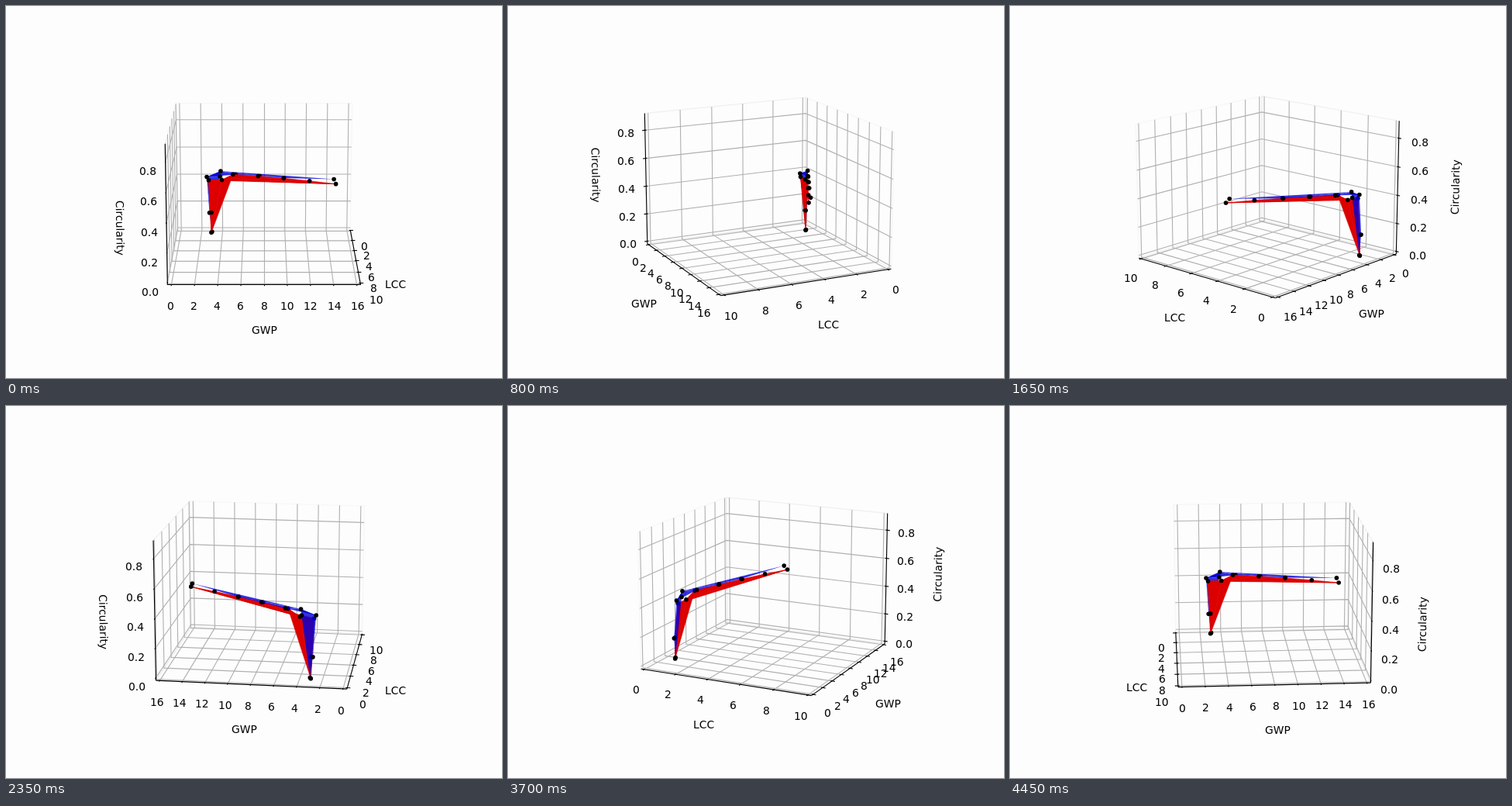
Recreate the animation shown at these times as an HTML page with a canvas. Size 640 by 480 pixels, loop 4500 ms.

```html
<!DOCTYPE html>
<html lang="en">
<head>
<meta charset="utf-8">
<title>Rotating 3D plot</title>
<style>
html, body { margin: 0; width: 100%; height: 100%; overflow: hidden; background: #fdfdfd; }
canvas { display: block; }
</style>
</head>
<body>
<canvas id="plot" width="640" height="480"></canvas>
<script>
const ctx = document.getElementById('plot').getContext('2d');
const LO = -1 / 48, HI = 49 / 48, EPS = 1e-9;
const ELEV = Math.PI / 12, SE = Math.sin(ELEV), CE = Math.cos(ELEV);
const TICK_GAP = 1.0372 / 12, LABEL_GAP = 2.796 / 12;
const PT = 100 / 72;

// side: the other direction in which the axis sits at the front
const axes = [
  { name: 'LCC', max: 10, step: 2, digits: 0, side: 1, pane: 242 },
  { name: 'GWP', max: 16, step: 2, digits: 0, side: 0, pane: 230 },
  { name: 'Circularity', max: 0.9, step: 0.2, digits: 1, side: 0, pane: 236 }
];

const point = (lcc, gwp, circ) => [lcc / 10, gwp / 16, circ / 0.9];

// evenly spaced points whose circularity rises and levels off
const chain = (n, lcc, gwp, dLcc, dGwp) => Array.from({ length: n }, (_, i) =>
  point(lcc + i * dLcc, gwp + i * dGwp, .448 + .012 * i - .0014 * i * i));

// triangles from one tip to each link of a chain
const fan = (tip, links) => links.slice(1).map((p, i) => [tip, links[i], p]);

function blueFaces() {
  const foot = point(.82, 3.03, .006), shin = point(.83, 2.8, .147);
  const left = point(1.1, 2.59, .42), mid = point(.99, 3.83, .42), top = point(1.02, 3.9, .461);
  const arm = [...chain(3, 1.45, 5.34, .7, 2.25), point(4.24, 14.36, .502)];
  return [...fan(left, [shin, foot, mid, top, arm[0]]), ...fan(top, arm)];
}

function redFaces() {
  const foot = point(.82, 2.96, 0), shin = point(.83, 2.98, .149);
  const left = point(1.12, 2.77, .397), mid = point(1.22, 4.02, .402);
  const arm = chain(5, 1.4, 5.09, .7525, 2.36);
  return [...fan(left, [shin, foot, mid, arm[4]]), ...fan(mid, [foot, ...arm])];
}

const surfaces = [
  { color: 'rgba(0,0,219,.8)', faces: blueFaces() },
  { color: '#dc0000', faces: redFaces(), edge: .6 }
];

let sin, cos;

// unit-cube point -> [screen x, screen y, distance]
function project(p) {
  const x = (p[0] - .5) * 8 / 7, y = (p[1] - .5) * 8 / 7, z = (p[2] - .5) * 6 / 7;
  const r = x * cos + y * sin, s = y * cos - x * sin;
  const w = 10 - r * CE - z * SE, k = 369.6 / .185 / w;
  return [332.995 + s * k, 237.405 - (z * CE - r * SE) * k, w];
}

function put(p, i, v) {
  const q = p.slice();
  q[i] = v;
  return q;
}

const flip = (p, i) => put(p, i, LO + HI - p[i]);

// push a point away from the cube centre, except along axis i
const away = (p, i, d) => p.map((v, j) => j === i ? v : v + (v > .5 ? d : -d));

function trace(pts) {
  ctx.beginPath();
  for (const p of pts) ctx.lineTo(p[0], p[1]);
}

// straight upright or level lines sit on whole pixels
function snap(pts) {
  const same = i => pts.every(p => Math.abs(p[i] - pts[0][i]) < .01);
  if (same(0)) return pts.map(p => [Math.floor(p[0] + .5) + .5, p[1]]);
  if (same(1)) return pts.map(p => [p[0], Math.ceil(p[1] - .5) - .5]);
  return pts;
}

function stroke(pts, color, width = .8 * PT) {
  trace(snap(pts.map(project)));
  ctx.strokeStyle = color;
  ctx.lineWidth = width;
  ctx.stroke();
}

function write(text, x, y) {
  ctx.fillText(text, Math.round(x - ctx.measureText(text).width / 2), Math.round(y));
}

function drawPanes(back) {
  axes.forEach(({ pane }, i) => {
    const j = (i + 1) % 3, k = (i + 2) % 3, a = flip(back, j);
    stroke([back, a, flip(a, k), flip(back, k), back], `rgba(${pane},${pane},${pane},.5)`, PT);
  });
}

function drawAxis({ name, max, step, digits, side }, i, back) {
  const [j, k] = [0, 1, 2].filter(n => n !== i);
  const start = flip(back, side), end = flip(start, i);
  const ticks = [];
  for (let t = 0; t <= max; t += step) ticks.push(t);

  for (const t of ticks) {
    const base = put(back, i, t / max);
    stroke([flip(base, j), base, flip(base, k)], '#b0b0b0');
  }
  stroke([start, end], '#000');

  const out = start[side] > .5 ? 1 / 12 : -1 / 12;
  ctx.fillStyle = '#000';
  for (const t of ticks) {
    const p = put(start, i, t / max), v = p[side];
    stroke([put(p, side, v + .2 * out), put(p, side, v - .1 * out)], '#000');
    const [x, y] = project(away(p, i, TICK_GAP));
    write(t.toFixed(digits), x, y + 11);
  }

  const [x, y] = project(away(put(start, i, .5), i, LABEL_GAP));
  if (i < 2) return write(name, x, y + 4);
  const a = project(start), b = project(end);
  let turn = Math.atan2(b[1] - a[1], b[0] - a[0]);
  if (turn < -Math.PI / 2) turn += Math.PI;
  ctx.save();
  ctx.translate(x + 1, y);
  ctx.rotate(turn);
  write(name, 0, 4);
  ctx.restore();
}

function drawSurface({ color, edge, faces, dots }) {
  const depth = f => f.reduce((sum, p) => sum + p[2], 0);
  ctx.fillStyle = ctx.strokeStyle = color;
  ctx.lineWidth = edge;
  for (const f of faces.sort((a, b) => depth(b) - depth(a))) {
    trace(f);
    ctx.closePath();
    ctx.fill();
    if (edge) ctx.stroke();
  }
  ctx.fillStyle = '#000';
  for (const [x, y] of dots) {
    ctx.beginPath();
    ctx.arc(x, y, 2.8, 0, 7);
    ctx.fill();
  }
}

function draw(now) {
  const azim = Math.floor(now / 50) % 90 * Math.PI / 45;
  sin = Math.sin(azim);
  cos = Math.cos(azim);
  ctx.fillStyle = '#fdfdfd';
  ctx.fillRect(0, 0, 640, 480);
  ctx.font = '13.889px "DejaVu Sans", sans-serif';
  ctx.lineJoin = 'round';

  const back = [cos < -EPS ? HI : LO, sin < -EPS ? HI : LO, LO];
  drawPanes(back);
  axes.forEach((axis, i) => drawAxis(axis, i, back));

  // the surface with the nearest point goes on top
  const near = s => Math.min(...s.dots.map(p => p[2]));
  surfaces.map(s => ({
    ...s,
    faces: s.faces.map(f => f.map(project)),
    dots: [...new Set(s.faces.flat())].map(project)
  })).sort((a, b) => near(b) - near(a)).forEach(drawSurface);
}

const t0 = performance.now();
function loop() {
  draw(performance.now() - t0);
  requestAnimationFrame(loop);
}
loop();
</script>
</body>
</html>
```
